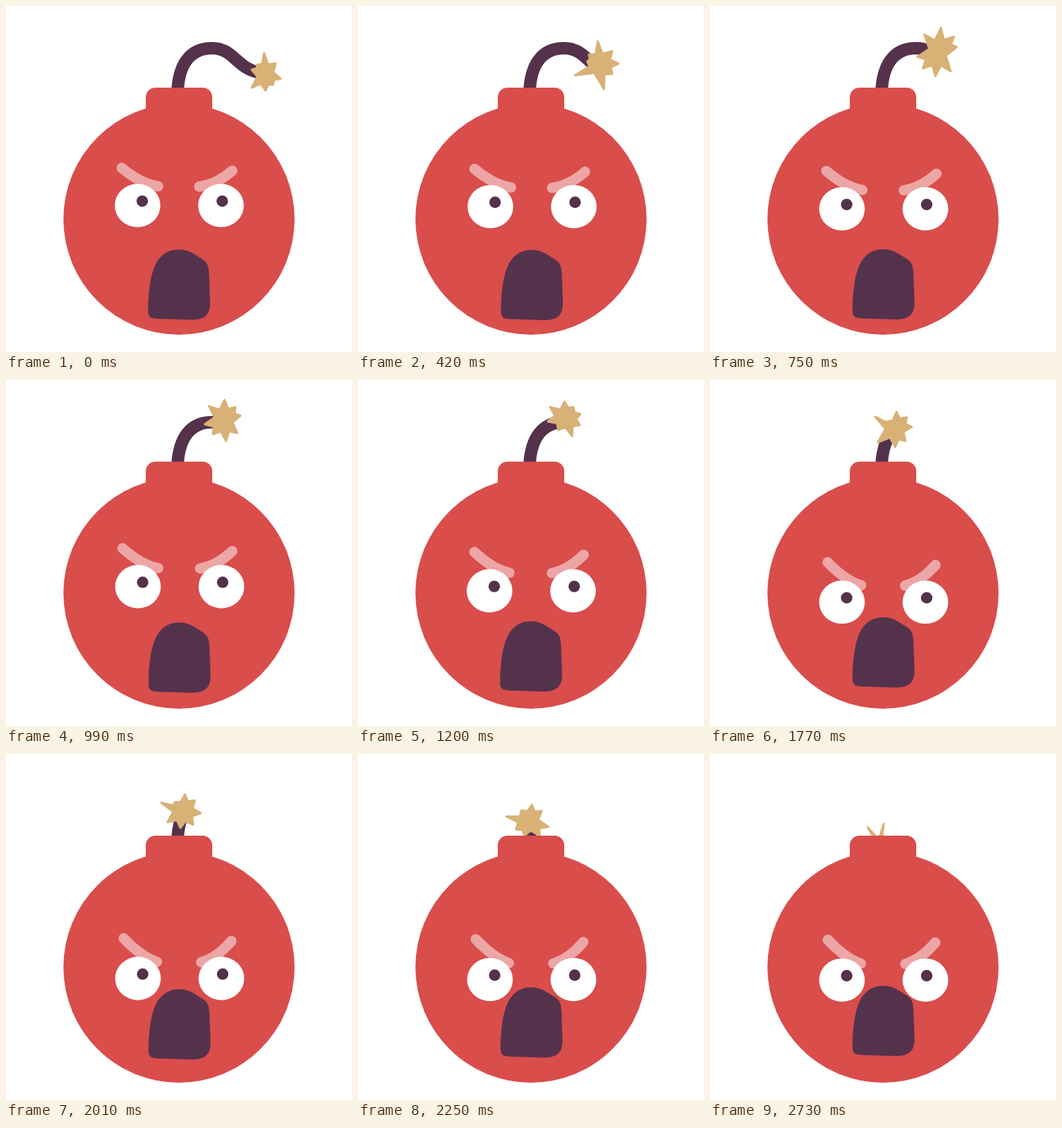
An HTML page for the animation above (2.76 s loop, 500 px wide and 500 px high).

```html
<!DOCTYPE html>
<html lang="en">
<head>
<meta charset="utf-8">
<title>Angry bomb</title>
<style>
  html, body { margin: 0; width: 100%; height: 100%; overflow: hidden; background: #fff; }
  svg { display: block; width: 100%; height: 100%; }
  .dark { fill: #55324c; }
  .brow { fill: none; stroke: #fff; stroke-opacity: .5; stroke-width: 15; stroke-linecap: round; }
</style>
</head>
<body>
<svg viewBox="0 0 500 500">
  <path id="fuse" d="M248 122C250 85 265 61 298 61C330 61 333 92 370 97" fill="none" stroke="#55324c" stroke-width="18"/>
  <path id="spark" fill="#d8b177" stroke="#d8b177" stroke-width="3" stroke-linejoin="round"/>
  <g fill="#d94d4b">
    <rect x="202" y="118" width="96" height="60" rx="14"/>
    <circle cx="250" cy="308" r="167"/>
  </g>
  <g id="face">
    <path id="leftBrow" class="brow"/>
    <path id="rightBrow" class="brow"/>
    <g id="eyes">
      <g fill="#fff">
        <ellipse cx="190.2" cy="288.3" rx="33" ry="31.3"/>
        <ellipse cx="310.8" cy="288.3" rx="33" ry="31.3"/>
      </g>
      <circle class="dark" cx="197" cy="282" r="8.3"/>
      <circle class="dark" cx="312.6" cy="282" r="8.3"/>
    </g>
    <path id="mouth" class="dark" d="M205.5 437C207 395 212 352 250 352C265 352 274 360 284 366C292 371 293 377 293.5 388L295 428C295.5 448 285 453.5 268 453.5L222 452C208 451.5 205 450 205.5 437Z"/>
  </g>
</svg>
<script>
const LOOP = 2760, STEP = 30, BURN = 2600;
const [fuse, spark, face, leftBrow, rightBrow, eyes, mouth] =
  ['fuse', 'spark', 'face', 'leftBrow', 'rightBrow', 'eyes', 'mouth'].map(id => document.getElementById(id));
const fuseLength = fuse.getTotalLength();

// Spark tips as x, y pairs around the burning end, clockwise from the top.
const poses = [
  { time: 0,    tips: [3,-29, 20,-14, 27,8, 16,17, 5,25, -15,21, -15,-5, -7,-12] },
  { time: 420,  tips: [2,-36, 23,-22, 32,-4, 23,11, 11,33, -31,13, -13,-7, -11,-17] },
  { time: 750,  tips: [6,-42, 25,-29, 29,-14, 20,21, -2,28, -20,17, -28,0, -18,-32] },
  { time: 1200, tips: [-3,-30, 10,-22, 20,-12, 19,4, 8,20, -12,11, -27,-1, -24,-22] },
  { time: 1770, tips: [3,-26, 18,-18, 25,-4, 16,16, 1,25, -24,18, -28,-19, -10,-12] },
  { time: 2250, tips: [0,-26, 14,-17, 24,6, 11,19, -11,19, -23,10, -37,-9, -15,-18] },
  { time: 2730, tips: [3,-21, 5,3, 12,10, 6,14, -8,14, -15,6, -20,-16, -6,2] }
];

const mix = (a, b, k) => a + (b - a) * k;

// S-shaped ease: steepness sets the slope, bias shifts it earlier.
const sCurve = (u, steepness, bias) =>
  u <= 0 ? 0 : 1 / (1 + Math.exp(-bias) * ((1 - u) / u) ** steepness);

function sparkTips(time) {
  let i = 0;
  while (i < poses.length - 2 && time >= poses[i + 1].time) i++;
  const from = poses[i], to = poses[i + 1];
  const k = Math.min(1, (time - from.time) / (to.time - from.time));
  const flat = from.tips.map((v, n) => mix(v, to.tips[n], k));
  return Array.from({ length: flat.length / 2 }, (_, n) => [flat[2 * n], flat[2 * n + 1]]);
}

function sparkPath(tips, hub) {
  const center = [0, 1].map(axis => tips.reduce((sum, tip) => sum + tip[axis], 0) / tips.length);
  const points = tips.flatMap((tip, n) => {
    const next = tips[(n + 1) % tips.length];
    const gap = Math.hypot(next[0] - tip[0], next[1] - tip[1]);
    const depth = Math.min(.5, gap / 60);
    const notch = [0, 1].map(axis => mix((tip[axis] + next[axis]) / 2, center[axis], depth));
    return [tip, notch];
  });
  return 'M' + points.map(([x, y]) => `${hub.x + x} ${hub.y + y}`).join('L') + 'Z';
}

const move = (node, x, y) => node.setAttribute('transform', `translate(${x} ${y})`);

function draw(time) {
  const drop = sCurve(time / LOOP, 2.4, .35);
  const lift = sCurve(time / LOOP, 1.9, -.92);
  const shake = Math.cos(2 * Math.PI * time / (4 * STEP));

  move(face, .5 - .6 * shake, .4 - .4 * shake);
  move(eyes, 0, 38 * drop);
  move(mouth, 0, -17.3 * lift);

  const outer = 34 * drop, inner = 42 * drop, middle = 38 * drop;
  leftBrow.setAttribute('d',
    `M${167.3 + 2.5 * drop} ${234 + outer}Q195 ${257 + middle} ${220 - 2.5 * drop} ${260.5 + inner}`);
  rightBrow.setAttribute('d',
    `M${327 - 2 * drop} ${238 + outer}Q${304 + drop} ${258 + middle} ${279.3 + 2.5 * drop} ${261 + inner}`);

  const left = fuseLength * Math.max(0, 1 - time / BURN);
  fuse.setAttribute('stroke-dasharray', `${left} ${2 * fuseLength}`);
  spark.setAttribute('d', sparkPath(sparkTips(time), fuse.getPointAtLength(left)));
}

const start = performance.now();
function tick() {
  const time = (performance.now() - start) % LOOP;
  draw(Math.floor(time / STEP) * STEP);
  requestAnimationFrame(tick);
}
tick();
</script>
</body>
</html>
```
